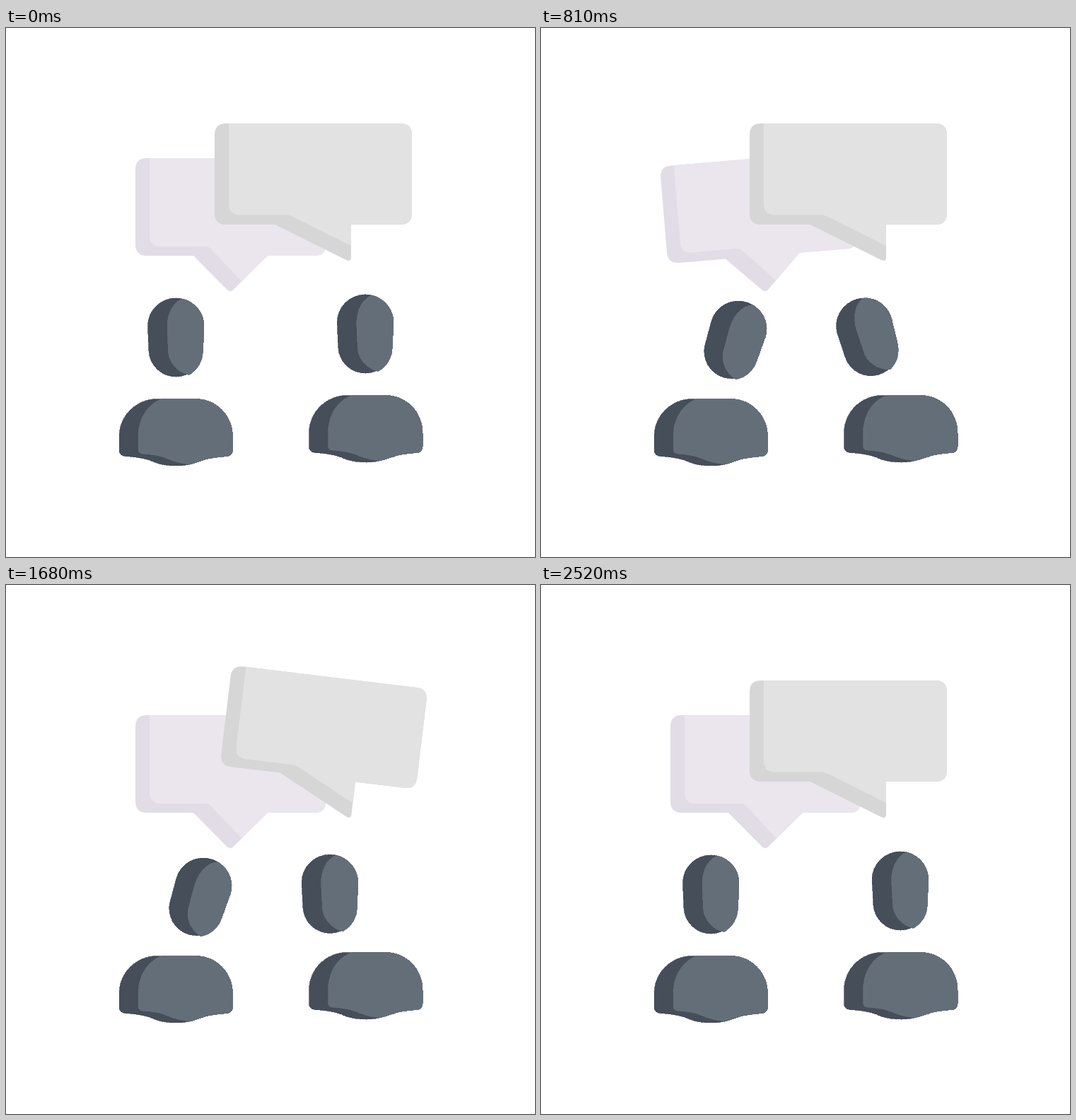
Recreate the animation shown at these times as an HTML page. Size 748 by 748 pixels, loop 3.55 s.

```html
<!DOCTYPE html>
<html lang="en">
<head>
<meta charset="utf-8">
<title>Conversation</title>
<style>
html, body { margin: 0; width: 100%; height: 100%; overflow: hidden; background: #fff; }
svg { display: block; width: 100%; height: 100%; }
.dark, .light { stroke-width: .7; shape-rendering: crispEdges; }
.dark { fill: #464e5a; stroke: #464e5a; }
.light { fill: #646e78; stroke: #646e78; }
</style>
</head>
<body>
<svg viewBox="0 0 748 748">
  <defs>
    <g id="head">
      <path class="dark" d="M200.500 421A39.700 39 0 0 1 280 421L278.500 457A38.300 38 0 0 1 202 457Z"/>
      <path class="light" d="M250 383C237 387 228 403 228 423L229.500 457C230 473 243 487 258.500 490.500A38.300 38 0 0 0 278.500 457L280 421A39.700 39 0 0 0 250 383Z"/>
    </g>
    <g id="body">
      <path class="dark" d="M160 578C160 548 184 524.5 214 524.5H268C298 524.5 320.5 548 320.5 578V597Q320.5 604.5 313 605.5C297 607 286 608.5 279 611C266 615.5 258 619 240 619C222 619 212 615 204 611.5C196 608.5 184 606.5 169 605.5Q160 605 160 596Z"/>
      <path class="light" d="M222 524.5C203 529 187 550 187 578V595Q187 601.5 193 602C206 603 217 604.5 224 607.5C238 613 246 615.5 259 616.5C266 615.5 273 613 279 611C286 608.5 297 607 313 605.5Q320.5 604.5 320.5 597V578C320.5 548 298 524.5 268 524.5Z"/>
    </g>
  </defs>
  <g id="bubbleA">
    <path fill="#e1dce6" d="M199 184H437Q452 184 452 199V307Q452 322 437 322H370L321 370.5Q317 374 313 370.5L265 322H199Q183 322 183 306V200Q183 184 199 184Z"/>
    <path fill="#ebe6ed" d="M203 184H437Q452 184 452 199V307Q452 322 437 322H370L333 358L288.5 311Q286 309 283 309H219Q203 309 203 293Z"/>
  </g>
  <g id="bubbleB">
    <path fill="#d6d6d6" d="M311 135H558Q574 135 574 151V262Q574 278 558 278H488V324Q488 330.500 482 328.500L380.500 278H311Q295 278 295 262V151Q295 135 311 135Z"/>
    <path fill="#e2e2e2" d="M315 135H558Q574 135 574 151V262Q574 278 558 278H488V308L405 266.5Q401 264.5 397 264.5H331Q315 264.5 315 248.5Z"/>
  </g>
  <use id="bodyL" href="#body"/>
  <use id="bodyR" href="#body"/>
  <use id="headL" href="#head"/>
  <use id="headR" href="#head"/>
</svg>
<script>
const LOOP = 3550, STEP = 30, LAST = 2520;

// Progress of t through a window, 0 to 1
const part = (t, from, length) => Math.min(1, Math.max(0, (t - from) / length));
const easeOut = u => 1 - (1 - u) ** 3;
const easeInOut = u => (1 - Math.cos(Math.PI * u)) / 2;
const bump = u => Math.sin(Math.PI * u);
// Squash first, then a smaller stretch
const bounce = u => Math.sin(2 * Math.PI * u) * (1 - u);

// A fading swing: time and angle of each turning point
const turns = [[0, 0], [215, -21], [480, 15], [700, -10], [945, 2.5], [1200, 0]];

function swing(t) {
  let angle = 0;
  for (let i = 1; i < turns.length; i++) {
    const [from, a] = turns[i - 1], [to, b] = turns[i];
    const u = part(t, from, to - from);
    angle += (b - a) * (i === 1 ? 1 - (1 - u) ** 2 : easeInOut(u));
  }
  return angle;
}

const move = (id, value) => document.getElementById(id).setAttribute('transform', value);

// Each person comes closer and later goes back, with a bounce at both moves
function person(t, come, back, length) {
  const u = part(t, come, length), v = part(t, back, length);
  return { near: easeOut(u) - easeOut(v), b: bounce(u) + bounce(v) };
}

function place(id, x, y, angle, b, pivotY) {
  move(id, `translate(${x} ${y}) rotate(${angle}) scale(${1 + 0.06 * b} ${1 - 0.06 * b}) translate(-240.2 ${-pivotY})`);
}

function draw(now) {
  const t = Math.min(LAST, Math.floor((now % LOOP) / STEP) * STEP);
  move('bubbleA', `rotate(${swing(t)} 317 372)`);
  move('bubbleB', `rotate(${swing(t - 1115)} 487 328)`);

  const left = person(t, 0, 2040, 390), right = person(t, 90, 1860, 450);
  const nod = bump(part(t, 1100, 500));
  const lean = 1 - easeInOut(part(t, 1080, 150));

  place('bodyL', 240.2, 619, 0, left.b, 619);
  place('bodyR', 508.7, 614, 0, right.b, 619);
  place('headL', 240.2 + 33.8 * left.near + 9 * nod, 438.5 + 3.3 * left.near + 12 * left.b + 6 * nod,
    17.5 * left.near + 7 * nod, left.b, 438.5);
  place('headR', 508 - (50 - 4 * lean) * right.near, 433.5 + 4.3 * right.near + 12 * right.b + nod,
    -16 * lean * right.near - 0.5 * (1 - lean), right.b, 438.5);
}

const start = performance.now();
function tick() {
  draw(performance.now() - start);
  requestAnimationFrame(tick);
}
tick();
</script>
</body>
</html>
```
